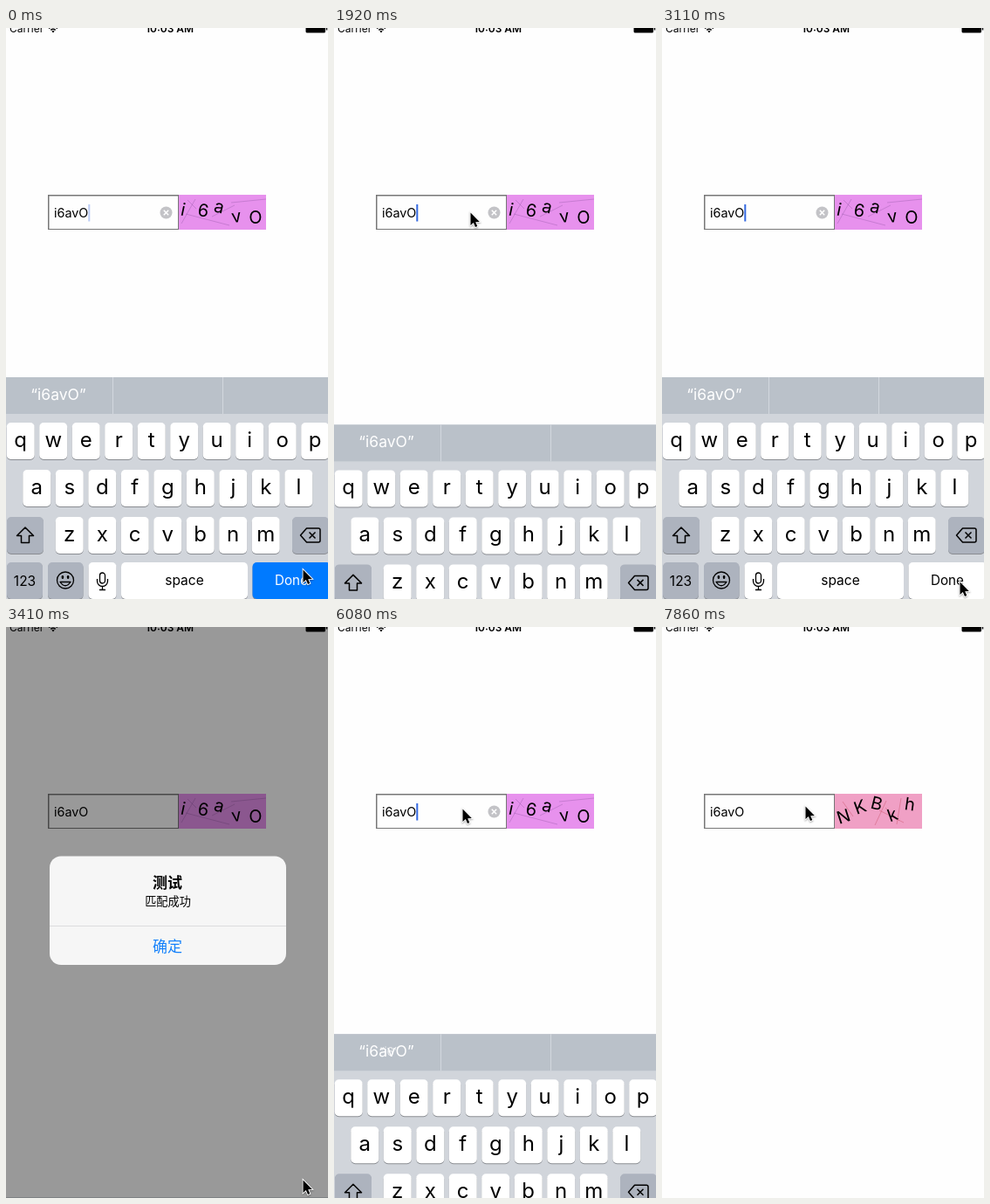
These frames come from a looping animation (369 px wide and 654 px high, 8000 ms). An HTML page with a canvas:

```html
<!DOCTYPE html>
<html lang="zh">
<head>
<meta charset="utf-8">
<style>
  html, body { margin: 0; width: 100%; height: 100%; overflow: hidden; background: #fefefe; }
  canvas { display: block; width: 369px; height: 654px; }
</style>
</head>
<body>
<canvas id="stage"></canvas>
<script>
const W = 369, H = 654, LOOP = 8000, STEP = 148.3;
const canvas = document.getElementById('stage');
const c = canvas.getContext('2d');
const dpr = window.devicePixelRatio || 1;
canvas.width = W * dpr;
canvas.height = H * dpr;

const LATIN = 'Inter, sans-serif';
const CJK = '"Noto Sans CJK SC", "Noto Sans CJK", sans-serif';
const BLUE = '#007aff';
const KEYBOARD_DROP = 258, EASE_LENGTH = 2.47;

const sessions = [[-4.05, 1.5], [12, 21.17], [40.1, 46.3]];
const doneTaps = [[1, 3], [20.5, 23], [46, 48]];
const alertIn = 21.17, alertOut = 29.68, captchaSwap = 50;
const mousePath = [
  [0, 340, 620], [1, 341, 633], [3, 341, 633], [7, 164, 222], [8, 158, 213], [10, 156, 214],
  [12, 156, 211], [14, 156, 211], [18.5, 338, 622], [20, 341, 634], [22, 341, 634],
  [23, 340, 633], [24, 340, 633], [28, 200, 352], [31, 200, 351], [34, 155, 229],
  [36, 132, 212], [37, 132, 212], [39, 147, 208], [41, 147, 208], [45, 340, 632],
  [47, 340, 632], [49.5, 250, 212], [50.5, 246, 212], [52, 184, 210], [53, 164, 205]
];

// Glyphs are [character, centre x, centre y, degrees]; lines are [x1, y1, x2, y2].
const captchas = [
  { fill: '#e791ed', ink: 'rgba(130,75,150,.4)',
    glyphs: [['i', 203, 208, 12], ['6', 226, 209, 8], ['a', 244, 206, 14], ['v', 264, 217, -8], ['O', 286, 217, 0]],
    lines: [[206, 213, 256, 226], [201, 224, 217, 196], [208, 197, 218, 207], [236, 216, 262, 203], [258, 200, 298, 196]] },
  { fill: '#f0a0c5', ink: 'rgba(190,60,80,.45)',
    glyphs: [['N', 208, 217, -18], ['K', 227, 206, -20], ['B', 246, 202, 14], ['k', 264, 215, -20], ['h', 284, 203, 8]],
    lines: [[207, 200, 219, 217], [244, 227, 257, 199], [269, 226, 274, 196], [249, 210, 277, 224], [256, 207, 272, 222]] }
];

const clamp = v => Math.max(0, Math.min(1, v));
const easeOut = (k, start, length = EASE_LENGTH) => 1 - (1 - clamp((k - start) / length)) ** 3;
const within = (k, [a, b]) => k >= a && k < b;

function rect(x, y, w, h, fill) {
  c.fillStyle = fill;
  c.fillRect(x, y, w, h);
}

function round(x, y, w, h, r, fill) {
  c.beginPath();
  c.roundRect(x, y, w, h, r);
  c.fillStyle = fill;
  c.fill();
}

function text(s, x, y, size, fill = '#000', { align = 'center', weight = 400, family = LATIN } = {}) {
  c.font = `${weight} ${size}px ${family}`;
  c.textAlign = align;
  c.fillStyle = fill;
  c.fillText(s, x, y);
}

function stroke(path, color = '#000', width = 1.5) {
  c.strokeStyle = color;
  c.lineWidth = width;
  c.stroke(new Path2D(path));
}

function faded(alpha, draw) {
  c.save();
  c.globalAlpha *= alpha;
  draw();
  c.restore();
}

function drawStatusBar() {
  text('Carrier', 4, 5, 12, '#000', { align: 'left' });
  text('10:03 AM', 187.5, 5, 12, '#000', { weight: 600 });
  stroke('M49 .5Q54-3.5 59 .5M51.3 2.4Q54 .2 56.7 2.4', '#000', 1.5);
  c.fillStyle = '#000';
  c.fill(new Path2D('M52.3 3.6Q54 2.4 55.7 3.6L54 5.5Z'));
  round(343.5, -4, 22.5, 9.5, 1.5, '#000');
  rect(366.8, -1, 1.4, 3.5, '#000');
}

function caretAlpha(k, start) {
  const phase = ((k - start) / 6.75) % 1;
  if (phase < .5) return 1;
  return phase < .85 ? clamp(1 - (phase - .5) / .15) : (phase - .85) / .15;
}

function drawField(k, session) {
  rect(48, 191, 150, 40, '#777');
  c.clearRect(49.5, 192.5, 147.5, 37.5);
  rect(49.5, 192.5, 147.5, 37.5, '#fefefe');
  text('i6avO', 55, 217, 14.4, '#000', { align: 'left' });
  if (!session) return;
  faded(caretAlpha(k, session[0]), () => rect(94.3, 202, 2, 19.5, '#3468e0'));
  round(176.5, 204.5, 14, 14, 7, '#c3c3c7');
  stroke('M180.8 208.8l5.4 5.4m0-5.4l-5.4 5.4', '#fff', 1.5);
}

function drawCaptcha({ fill, ink, glyphs, lines }) {
  rect(198, 191, 100, 40, fill);
  for (const [x1, y1, x2, y2] of lines) stroke(`M${x1} ${y1}L${x2} ${y2}`, ink, .8);
  for (const [glyph, x, y, angle] of glyphs) {
    c.save();
    c.translate(x, y);
    c.rotate(angle * Math.PI / 180);
    text(glyph, 0, /[av]/.test(glyph) ? 5.5 : 7, 20);
    c.restore();
  }
}

function key(x, y, w, fill = '#fff') {
  round(x, y + 1, w, 42, 5, '#898c91');
  round(x, y, w, 42, 5, fill);
}

function drawKeyboard(drop, donePressed, suggestionChanging) {
  c.save();
  c.translate(0, drop);
  rect(0, 400, W, 260, '#d1d5db');
  rect(0, 400, W, 42, '#bac1c9');
  rect(122, 400, 1, 42, '#d3d8de');
  rect(248, 400, 1, 42, '#d3d8de');
  text('“i6avO”', 60, 426, 17.5, '#fff');
  if (suggestionChanging) faded(.7, () => text('“i6”', 63, 425, 13, '#fff'));

  [['qwertyuiop', 16.7, 452], ['asdfghjkl', 35.3, 506], ['zxcvbnm', 72.7, 560]].forEach(([letters, x, y]) =>
    [...letters].forEach((letter, i) => {
      const center = x + i * 37.5;
      key(center - 16, y, 32);
      text(letter, center, y + 28, 24);
    }));

  const gray = '#adb3be';
  key(1, 560, 42, gray);
  key(328, 560, 42, gray);
  key(1, 612, 41, gray);
  key(48, 612, 40.5, gray);
  key(94.5, 612, 32);
  key(132, 612, 145);
  key(282.5, 612, 90, donePressed ? '#fff' : BLUE);
  text('123', 21.5, 638.5, 15.5);
  text('space', 204.5, 638, 15.5);
  text('Done', 327, 638, 15.2, donePressed ? '#000' : '#fff');

  c.lineJoin = 'round';
  stroke('M22 572L31.5 581.5H26.5V589.5H17.5V581.5H12.5Z');
  stroke('M344.5 573H358Q360 573 360 575V587Q360 589 358 589H344.5L337.5 581Z');
  stroke('M347.5 577.5l7 7m0-7l-7 7');
  stroke('M58.5 632.5a9.5 9.5 0 1 0 19 0a9.5 9.5 0 1 0-19 0M62 634.5Q68 643 74 634.5Z', '#000', 1.3);
  round(63.7, 627, 2.4, 4, 1.2, '#000');
  round(69.9, 627, 2.4, 4, 1.2, '#000');
  stroke('M107.5 627a3 3 0 0 1 6 0v6a3 3 0 0 1-6 0ZM104.5 631v2.5a6 6 0 0 0 12 0V631M110.5 639.5V643.5M107 643.5h7', '#000', 1.3);
  c.restore();
}

function drawAlert(k) {
  const shown = easeOut(k, alertIn, 1.7);
  const visible = shown * (1 - easeOut(k, alertOut));
  if (visible < .002) return;
  rect(0, 0, W, H, `rgba(0,0,0,${.4 * visible})`);
  faded(visible, () => {
    const scale = 1.2 - .2 * shown;
    c.translate(185.5, 325);
    c.scale(scale, scale);
    c.translate(-185.5, -325);
    round(50, 262.5, 271, 124.5, 13, '#f6f6f6');
    rect(50, 342, 271, 1, '#dcdcde');
    text('测试', 185, 298.5, 17, '#000', { weight: 700, family: CJK });
    text('匹配成功', 185.5, 319, 13.2, '#000', { family: CJK });
    text('确定', 185, 371.5, 17, '#1380fb', { family: CJK });
  });
}

function drawMouse(k) {
  const next = mousePath.findIndex(p => p[0] > k);
  const [k1, x1, y1] = mousePath.at(next < 0 ? -1 : next);
  const [k0, x0, y0] = mousePath[next < 0 ? mousePath.length - 1 : next - 1];
  const u = k1 > k0 ? (k - k0) / (k1 - k0) : 1;
  const s = u * u * (3 - 2 * u);
  c.save();
  c.translate(x0 + (x1 - x0) * s, y0 + (y1 - y0) * s);
  const arrow = new Path2D('M.5 .5V15L3.8 12L6 17L8.3 16L6.2 11.2L10.8 11Z');
  c.lineJoin = 'miter';
  c.strokeStyle = '#fff';
  c.lineWidth = 1.8;
  c.shadowColor = 'rgba(0,0,0,.35)';
  c.shadowBlur = 2 * dpr;
  c.shadowOffsetY = dpr;
  c.stroke(arrow);
  c.shadowColor = 'transparent';
  c.fillStyle = '#000';
  c.fill(arrow);
  c.restore();
}

function render(time) {
  const k = Math.min(53, Math.floor((time + 8) / STEP));
  const session = sessions.find(s => within(k, s));
  c.setTransform(dpr, 0, 0, dpr, 0, 0);
  rect(0, 0, W, H, '#fefefe');
  drawStatusBar();
  drawField(k, session);
  drawCaptcha(captchas[k < captchaSwap ? 0 : 1]);

  const raised = Math.max(...sessions.map(([start, end]) => easeOut(k, start) * (1 - easeOut(k, end))));
  const changing = session === sessions[2] && raised < .99;
  if (raised > .005) drawKeyboard(KEYBOARD_DROP * (1 - raised), doneTaps.some(tap => within(k, tap)), changing);
  drawAlert(k);
  drawMouse(k);
}

function tick() {
  render(performance.now() % LOOP);
  requestAnimationFrame(tick);
}
tick();
</script>
</body>
</html>
```
